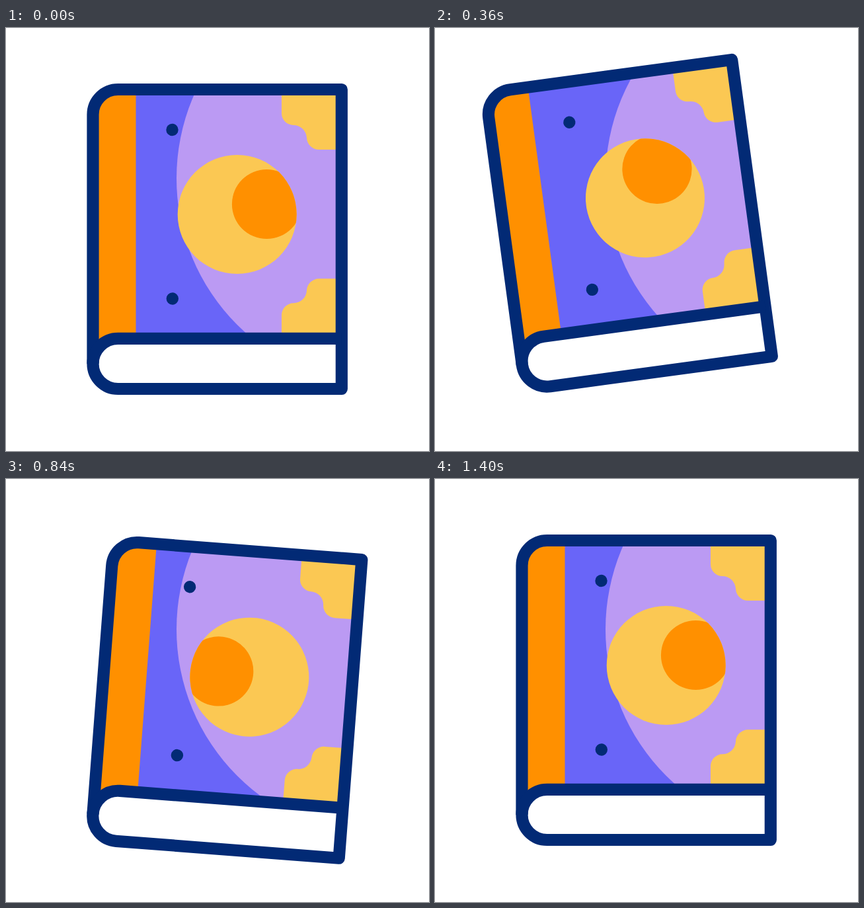
Recreate the animation shown at these times as an HTML page. Size 640 px wide and 640 px high, loop 2520 ms.

```html
<!DOCTYPE html>
<html lang="en">
<head>
<meta charset="utf-8">
<title>Book</title>
<style>
  html, body { margin: 0; height: 100%; overflow: hidden; background: #fff; }
  svg { display: block; width: 100%; height: 100%; }
</style>
</head>
<body>
<svg viewBox="0 0 640 640">
  <defs>
    <clipPath id="cover">
      <path d="M507.5 93H169.5A38 38 0 0 0 131.5 131V508A38 38 0 0 1 169.5 469.8H507.5Z"/>
    </clipPath>
    <clipPath id="disc"><circle cx="349.7" cy="282" r="90"/></clipPath>
    <path id="corner" d="M417 93V129A18 18 0 0 0 435 147A20 20 0 0 1 455 166A18.5 18.5 0 0 0 473.5 184H508V93Z"/>
  </defs>
  <g id="book">
    <g clip-path="url(#cover)">
      <path fill="#6965f8" d="M122 84H517V480H122Z"/>
      <circle id="halo" cx="571.3" cy="227.5" r="313.3" fill="#bb9af3"/>
      <path fill="#ff9000" d="M122 84H196.5V520H122Z"/>
      <g fill="#fbc853">
        <use href="#corner"/>
        <use href="#corner" transform="matrix(1 0 0 -1 0 563.3)"/>
      </g>
      <g id="moon">
        <circle cx="349.7" cy="282" r="90" fill="#fbc853"/>
        <circle cx="394.5" cy="266.5" r="52.6" fill="#ff9000" clip-path="url(#disc)"/>
      </g>
      <g fill="#022a75">
        <circle cx="251.5" cy="154" r="9.2"/>
        <circle cx="251.8" cy="409.5" r="9.2"/>
      </g>
    </g>
    <g fill="none" stroke="#022a75" stroke-width="18.2" stroke-linejoin="round">
      <path d="M507.8 93H169.5A38 38 0 0 0 131.5 131V507.9A38 38 0 0 0 169.5 546H507.8Z"/>
      <path d="M131.5 507.9A38 38 0 0 1 169.5 469.8H507.8"/>
    </g>
  </g>
</svg>
<script>
const LOOP = 2520;
const [book, halo, moon] = ["book", "halo", "moon"].map(id => document.getElementById(id));

// Ease with flat ends; a and b are the x handles of the cubic curve.
function ease(u, a, b) {
  let lo = 0, hi = 1;
  for (let i = 0; i < 24; i++) {
    const s = (lo + hi) / 2, r = 1 - s;
    if (3 * a * s * r * r + 3 * b * s * s * r + s * s * s < u) lo = s; else hi = s;
  }
  return lo * lo * (3 - 2 * lo);
}

// Each key: [time, value, x handle out of the previous key]
function track(t, keys) {
  const i = keys.findIndex(k => t < k[0]);
  if (i < 0) return keys[keys.length - 1][1];
  const [t0, v0] = keys[i - 1], [t1, v1, a] = keys[i];
  return v0 + (v1 - v0) * ease((t - t0) / (t1 - t0), a, 1 / 3);
}

const tilt = [[0, 0], [303, -8, 1 / 6], [695, 7, 2 / 3], [1015, 0, 2 / 3]];
const spin = [[0, 0], [303, -42, 1 / 6], [1300, 360, 2 / 3]];

function turn(el, deg, x, y) {
  el.setAttribute("transform", `rotate(${deg} ${x} ${y})`);
}

function draw(now) {
  const t = now % LOOP, angle = track(t, tilt);
  turn(book, angle, 143.5, 506.5);
  turn(halo, -angle, 143.5, 506.5); // the halo stays still behind the moving cover
  turn(moon, track(t, spin), 350.9, 282.3);
  requestAnimationFrame(draw);
}
draw(0);
</script>
</body>
</html>
```
